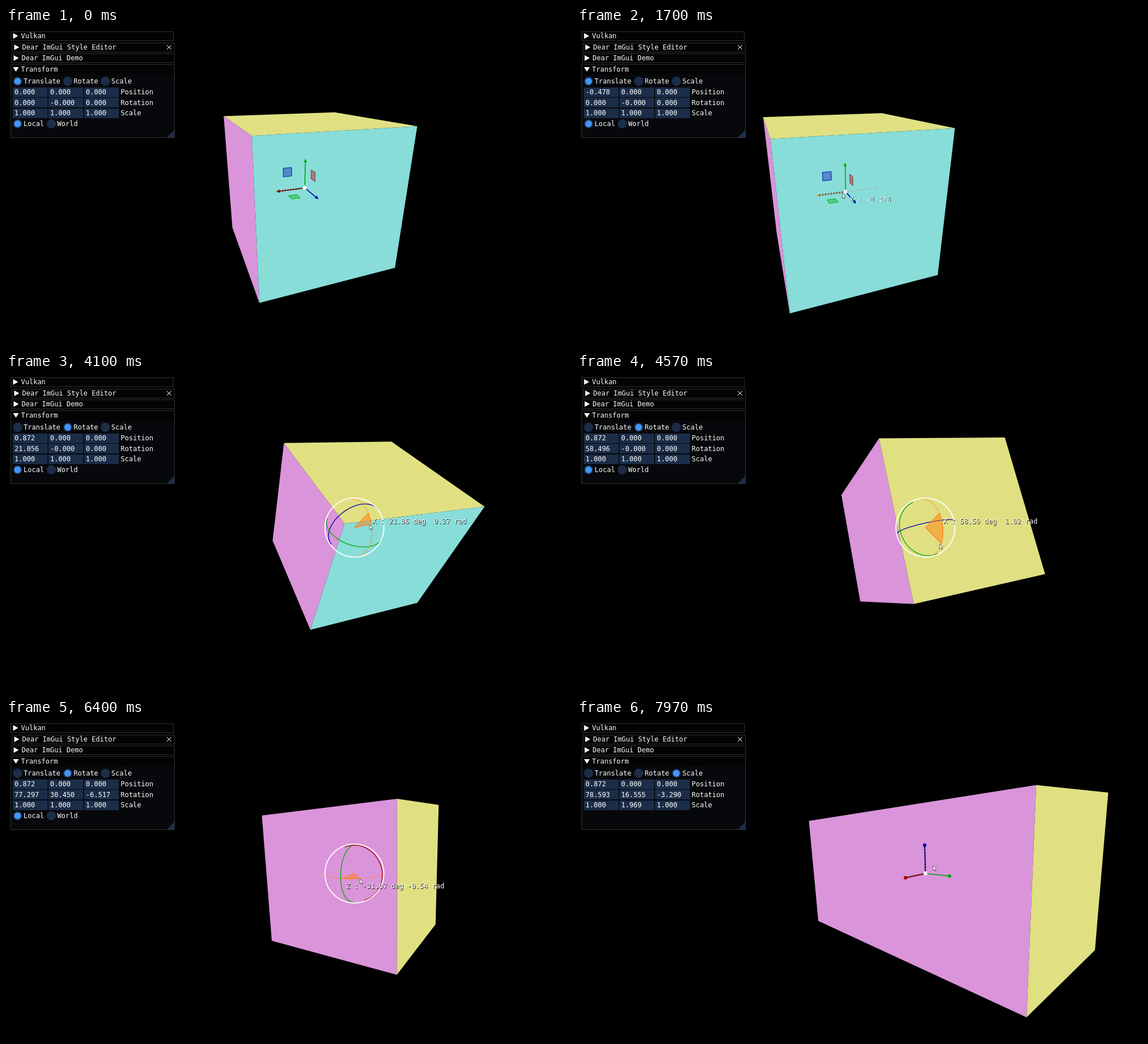
An HTML page with a canvas that plays this animation: 998x561 px, repeating every 8 s.

```html
<!DOCTYPE html>
<html lang="en">
<head>
<meta charset="utf-8">
<title>Transform gizmo</title>
<style>
  html, body { margin: 0; width: 100%; height: 100%; overflow: hidden; background: #000; }
  canvas { display: block; width: 998px; height: 561px; }
</style>
</head>
<body>
<canvas id="stage" width="998" height="561"></canvas>
<script>
const g = document.getElementById('stage').getContext('2d');
const LOOP = 8000, DEG = Math.PI / 180;
const FONT = '12px "DejaVu Sans Mono", monospace';

// Vectors
const add = (a, b) => a.map((v, i) => v + b[i]);
const mul = (a, k) => a.map(v => v * k);
const dot = (a, b) => a.reduce((sum, v, i) => sum + v * b[i], 0);
const mix = (a, ka, b, kb) => add(mul(a, ka), mul(b, kb));

// Camera: 60 degree lens, turned and tilted by 20 degrees
const sin20 = Math.sin(20 * DEG), cos20 = Math.cos(20 * DEG);
const RIGHT = [cos20, 0, sin20];
const UP = [sin20 * sin20, cos20, -cos20 * sin20];
const FORWARD = [sin20 * cos20, -sin20, -cos20 * cos20];
const FOCAL = 280.5 / Math.tan(30 * DEG);
const ORIGIN = [0.247, -0.014, 4.17];
const EYE = mul(add(add(mul(RIGHT, ORIGIN[0]), mul(UP, ORIGIN[1])), mul(FORWARD, ORIGIN[2])), -1);
const depth = p => ORIGIN[2] + dot(FORWARD, p);
const project = p => {
  const k = FOCAL / depth(p);
  return [499 + k * (ORIGIN[0] + dot(RIGHT, p)), 280.5 - k * (ORIGIN[1] + dot(UP, p))];
};

// Motion tables: [time, value]
const MOVE_X = [[120, 0], [450, 1.8], [860, 0], [1280, -1.09], [1700, -0.48], [2250, 1.42], [2530, 1.023], [2720, 0.872]];
const TURN_X = [[3650, 0], [4100, 21], [4200, 28], [4900, 79], [5080, 83], [5300, 79.072]];
const TURN_Z = [[5650, 0], [5870, -16], [6150, -40], [6400, -31.11], [6700, -20], [6880, -16.87]];
const SCALE_Y = [[7330, 1], [7530, 1.27], [7850, 2], [7940, 1.969]];
const POINTER = [[40, 505, 300], [120, 520, 286], [2720, 609, 277], [3120, 112, 96], [3180, 112, 96], [3580, 638, 248],
  [5300, 634, 313], [5480, 598, 279], [5650, 598, 279], [6880, 612, 280], [7090, 178, 96],
  [7140, 178, 96], [7310, 622, 270], [7940, 629, 257]];
const ROTATE_AT = 3150, SCALE_AT = 7115;

// Smooth curve through the table that never overshoots it
function follow(keys, t, col = 1) {
  const last = keys.length - 1;
  if (t <= keys[0][0]) return keys[0][col];
  if (t >= keys[last][0]) return keys[last][col];
  const i = keys.findIndex(k => k[0] > t) - 1;
  const slope = n => n < 0 || n >= last ? 0 : (keys[n + 1][col] - keys[n][col]) / (keys[n + 1][0] - keys[n][0]);
  const tangent = n => {
    const a = slope(n - 1), b = slope(n);
    return a * b > 0 ? 2 * a * b / (a + b) : 0;
  };
  const span = keys[i + 1][0] - keys[i][0], u = (t - keys[i][0]) / span;
  const h = u * u * (3 - 2 * u);
  return keys[i][col] * (1 - h) + keys[i + 1][col] * h
    + span * u * (1 - u) * ((1 - u) * tangent(i) - u * tangent(i + 1));
}
const during = (keys, t) => t >= keys[0][0] && t < keys[keys.length - 1][0];

// Drawing helpers
function trace(points, close) {
  g.beginPath();
  points.forEach(p => g.lineTo(p[0], p[1]));
  if (close) g.closePath();
}
function poly(points, fill, stroke, width = 1) {
  trace(points, true);
  if (fill) { g.fillStyle = fill; g.fill(); }
  if (stroke) { g.strokeStyle = stroke; g.lineWidth = width; g.stroke(); }
}
function line(points, color, width) {
  trace(points);
  g.strokeStyle = color; g.lineWidth = width; g.stroke();
}
function disc(x, y, r, color) {
  g.beginPath(); g.arc(x, y, r, 0, 7);
  g.fillStyle = color; g.fill();
}
function ring(x, y, r, color, width) {
  g.beginPath(); g.arc(x, y, r, 0, 2 * Math.PI);
  g.strokeStyle = color; g.lineWidth = width; g.stroke();
}
function rect(x, y, w, h, fill, stroke) {
  g.fillStyle = fill; g.fillRect(x, y, w, h);
  if (stroke) { g.strokeStyle = stroke; g.lineWidth = 1; g.strokeRect(x + 0.5, y + 0.5, w - 1, h - 1); }
}
function text(str, x, y, color = '#fff') {
  g.fillStyle = color; g.fillText(str, x, y + 4);
}

// Scene state
function stateAt(t) {
  const x = follow(MOVE_X, t), a = follow(TURN_X, t) * DEG, b = follow(TURN_Z, t) * DEG;
  const ca = Math.cos(a), sa = Math.sin(a), cb = Math.cos(b), sb = Math.sin(b);
  const center = [x, 0, 0];
  return {
    t, x, a, b, center,
    scale: follow(SCALE_Y, t),
    axes: [[cb, sb * ca, sb * sa], [-sb, cb * ca, cb * sa], [0, -sa, ca]],
    size: 49.9 * depth(center) / FOCAL,
    mode: t < ROTATE_AT ? 0 : t < SCALE_AT ? 1 : 2
  };
}

const FACES = ['#da94da', '#e0e083', '#88ddd9'];
function drawCube(s) {
  const half = [s.axes[0], mul(s.axes[1], s.scale), s.axes[2]];
  half.forEach((n, i) => [-1, 1].forEach(side => {
    const u = half[(i + 1) % 3], v = half[(i + 2) % 3];
    const mid = add(s.center, mul(n, side));
    if (dot(mul(n, side), mix(mid, 1, EYE, -1)) >= 0) return;
    const corners = [[-1, -1], [1, -1], [1, 1], [-1, 1]].map(([p, q]) => project(add(mid, mix(u, p, v, q))));
    poly(corners, FACES[i]);
  }));
}

const AXIS = ['170,0,0', '0,170,0', '0,0,170'];
const HOT = 'rgba(255,128,16,0.541)';
const GRAY = 'rgba(170,170,170,0.67)';
const axisColor = (i, hot) => i === hot ? HOT : `rgb(${AXIS[i]})`;

function tooltip(str, [x, y]) {
  text(str, x + 8, y + 14.5, '#000');
  text(str, x + 7.3, y + 13.8);
}

// Axes turned toward the camera, flagged when reversed
function facingAxes(s) {
  return s.axes.map(v => {
    const flipped = dot(FORWARD, v) > 1e-6;
    return { dir: mul(v, flipped ? -s.size : s.size), flipped };
  });
}
function drawAxes(s, hot, lengths, drawEnd) {
  const axes = facingAxes(s);
  axes.forEach(({ dir, flipped }, i) => {
    const at = k => project(add(s.center, mul(dir, k)));
    const color = axisColor(i, hot), end = at(lengths[i]);
    if (lengths[i] !== 1) {
      line([at(0.1), at(1)], '#404040', 1.6);
      disc(...at(1), 3.1, '#404040');
    }
    line([at(0.1), end], color, 1.6);
    drawEnd(end, at(0), color);
    if (flipped) for (let j = 1; j < 10; j++) {
      line([at(0.1 * j * lengths[i]), at((0.1 * j + 0.05) * lengths[i])], 'rgba(0,0,0,0.5)', 3.1);
    }
  });
  return axes;
}

function arrowHead(end, base, color) {
  const len = Math.hypot(end[0] - base[0], end[1] - base[1]);
  const dx = (end[0] - base[0]) / len * 3.1, dy = (end[1] - base[1]) / len * 3.1;
  poly([[end[0] + dx, end[1] + dy], [end[0] - dx + dy, end[1] - dy - dx], [end[0] - dx - dy, end[1] - dy + dx]], color);
}

function drawMoveGizmo(s) {
  const dragging = during(MOVE_X, s.t), mid = project(s.center);
  const axes = drawAxes(s, dragging ? 0 : -1, [1, 1, 1], arrowHead);
  axes.forEach((_, i) => {
    const u = axes[(i + 1) % 3].dir, v = axes[(i + 2) % 3].dir;
    const quad = [[.5, .5], [.5, .8], [.8, .8], [.8, .5]].map(([p, q]) => project(add(s.center, mix(u, p, v, q))));
    poly(quad, `rgba(${AXIS[i]},0.38)`, `rgb(${AXIS[i]})`, 0.9);
  });
  disc(...mid, 3.1, '#fff');
  if (!dragging) return;
  const home = project([0, 0, 0]);
  ring(...home, 3, GRAY, 0.6);
  ring(...mid, 3, GRAY, 0.6);
  line([home, mid], GRAY, 1);
  tooltip('X : ' + s.x.toFixed(3), mid);
}

const fanX = (s, angle) => project(add(s.center, [0, s.size * Math.sin(45 * DEG - angle), s.size * Math.cos(45 * DEG - angle)]));
const fanZ = (s, angle) => {
  const k = 146 * DEG + angle, across = [0, Math.cos(s.a), Math.sin(s.a)];
  return project(add(s.center, mul(mix([1, 0, 0], Math.cos(k), across, Math.sin(k)), s.size)));
};

function drawTurnGizmo(s) {
  const { t } = s, onX = during(TURN_X, t), onZ = during(TURN_Z, t);
  const hot = onX || (t > 3560 && t < 3650) ? 0 : onZ || (t > 5470 && t < 5650) ? 2 : -1;
  const view = mix(EYE, 1, s.center, -1), mid = project(s.center);
  [2, 1, 0].forEach(i => {
    const u = s.axes[(i + 1) % 3], v = s.axes[(i + 2) % 3];
    const start = Math.atan2(dot(v, view), dot(u, view)) - Math.PI / 2;
    const arc = Array.from({ length: 49 }, (_, n) => {
      const k = start + Math.PI * n / 48;
      return project(add(s.center, mul(mix(u, Math.cos(k), v, Math.sin(k)), s.size)));
    });
    line(arc, axisColor(i, hot), 1.3);
  });
  ring(mid[0], mid[1], 52, '#fff', 1.8);
  if (!onX && !onZ) return;
  const fan = onX ? fanX : fanZ, angle = onX ? s.a : s.b;
  const sweep = Array.from({ length: 25 }, (_, n) => fan(s, angle * n / 24));
  poly([mid, ...sweep], 'rgba(255,128,16,0.5)', 'rgb(255,128,16)', 1.1);
  const pad = v => v.toFixed(2).padStart(5);
  tooltip(`${onX ? 'X' : 'Z'} : ${pad(angle / DEG)} deg ${pad(angle)} rad`, sweep[0]);
}

function drawScaleGizmo(s) {
  const dragging = during(SCALE_Y, s.t), mid = project(s.center);
  drawAxes(s, dragging ? 1 : -1, [1, dragging ? s.scale : 1, 1], (end, _, color) => disc(...end, 3.1, color));
  disc(...mid, 3.1, '#fff');
  if (dragging) tooltip('Y : ' + s.scale.toFixed(2), mid);
}

// Panel
const FRAME = '#1b2d48', BORDER = '#33332c', WINDOW = '#07080b';
function radio(label, x, y, on) {
  disc(x, y, 8.2, FRAME);
  if (on) disc(x, y, 6, '#4296fa');
  text(label, x + 10.5, y);
}
function titleBar(label, x, y, w) {
  rect(x, y - 8, w, 17, '#030304', BORDER);
  poly([[x + 4.5, y - 5], [x + 13.5, y], [x + 4.5, y + 5]], '#fff');
  text(label, x + 18.5, y);
}
function drawPanel(s) {
  titleBar('Vulkan', 8, 14, 288);
  titleBar('Dear ImGui Style Editor', 10, 34, 288);
  titleBar('Dear ImGui Demo', 9, 53, 289);
  line([[284, 30], [292, 38]], '#fff', 1);
  line([[292, 30], [284, 38]], '#fff', 1);
  rect(8, 64, 290, 130, WINDOW, BORDER);
  rect(9, 65, 288, 17, '#030304');
  poly([[12.5, 69], [22.5, 69], [17.5, 77]], '#fff');
  text('Transform', 26.5, 73);
  poly([[297, 180], [297, 193], [284, 193]], '#1b2d4a');

  radio('Translate', 20.5, 94, s.mode === 0);
  radio('Rotate', 109, 94, s.mode === 1);
  radio('Scale', 175.5, 94, s.mode === 2);

  const [x, y, z] = s.axes;
  const euler = [Math.atan2(y[2], z[2]), -Math.asin(x[2]), Math.atan2(x[1], x[0])].map(v => (v / DEG).toFixed(3));
  if (s.b === 0) { euler[1] = '-0.000'; euler[2] = '0.000'; }
  const rows = [
    ['Position', [s.x.toFixed(3), '0.000', '0.000']],
    ['Rotation', euler],
    ['Scale', ['1.000', s.scale.toFixed(3), '1.000']]
  ];
  rows.forEach(([label, values], r) => {
    const cy = 113 + r * 18.6;
    values.forEach((v, c) => {
      rect(12 + c * 63, Math.round(cy - 8.5), 61.5, 17, FRAME);
      text(v, 15 + c * 63, cy);
    });
    text(label, 202.5, cy);
  });
  if (s.mode < 2) {
    radio('Local', 20.5, 169, true);
    radio('World', 80, 169, false);
  }
}

function pointerAt(s) {
  const { t } = s;
  if (during(MOVE_X, t)) return add(project([s.x - 0.06, 0, 0]), [1, 2]);
  if (during(TURN_X, t)) return add(fanX(s, s.a), [-3, 1]);
  if (during(TURN_Z, t)) return add(fanZ(s, s.b), [2, 1]);
  return [follow(POINTER, t, 1), follow(POINTER, t, 2)];
}
function drawPointer(s) {
  if (s.t < 40) return;
  const [x, y] = pointerAt(s);
  const shape = [[0, 0], [0, 8.5], [2, 6.8], [3.4, 9.8], [4.6, 9.2], [3.3, 6.4], [6, 6.1]];
  poly(shape.map(p => [x + p[0], y + p[1]]), '#fff', '#333', 0.7);
}

function render(t) {
  const s = stateAt(t);
  g.fillStyle = '#000';
  g.fillRect(0, 0, 998, 561);
  g.font = FONT;
  drawCube(s);
  [drawMoveGizmo, drawTurnGizmo, drawScaleGizmo][s.mode](s);
  drawPanel(s);
  drawPointer(s);
}

const began = performance.now();
function tick() {
  render((performance.now() - began) % LOOP);
  requestAnimationFrame(tick);
}
tick();
</script>
</body>
</html>
```
